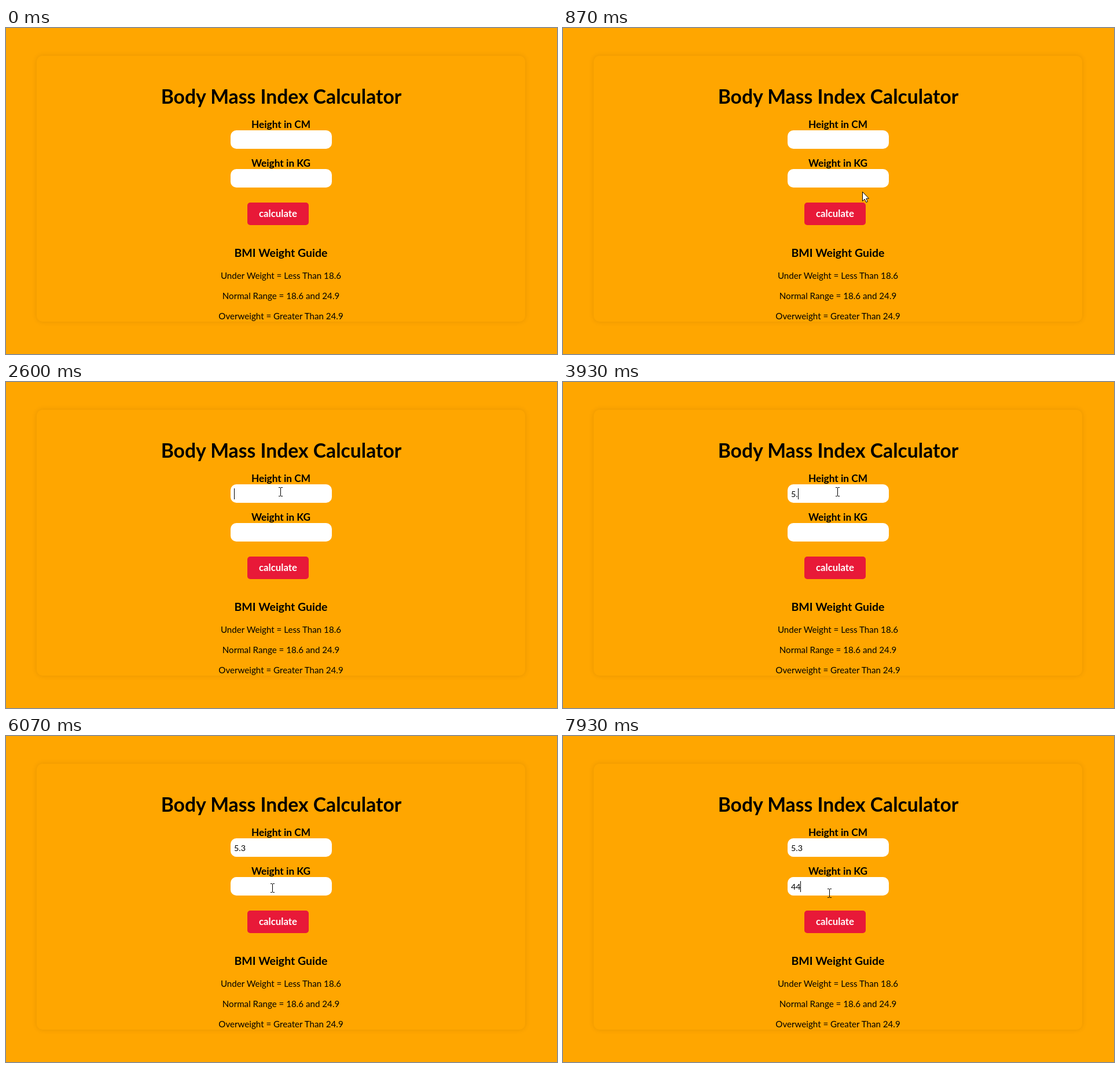
An HTML page that plays this animation: 952x564 px, repeating every 8 s.

```html
<!DOCTYPE html>
<html lang="en">
<head>
<meta charset="utf-8">
<title>Body Mass Index Calculator</title>
<style>
  html, body { margin: 0; width: 100%; height: 100%; overflow: hidden; background: #ffa600; }
  .panel {
    position: absolute; left: 53px; top: 48px; width: 844px; height: 460px;
    border-radius: 10px; box-shadow: 0 0 10px rgba(0, 0, 0, .1);
  }
  svg { position: absolute; left: 0; top: 0; font-family: Lato, sans-serif; font-size: 15.15px; }
  .centred { text-anchor: middle; }
  .bold { font-weight: 700; font-size: 17.3px; }
  .value { font-size: 14.3px; }
</style>
</head>
<body>
<div class="panel"></div>
<svg width="952" height="564" viewBox="0 0 952 564">
  <g class="centred">
    <g class="bold">
      <text x="475.5" y="130.5" font-size="33.7">Body Mass Index Calculator</text>
      <text x="475" y="173">Height in CM</text>
      <text x="475" y="240">Weight in KG</text>
      <text x="475" y="396" font-size="19.5">BMI Weight Guide</text>
    </g>
    <text x="475" y="434">Under Weight = Less Than 18.6</text>
    <text x="475" y="469">Normal Range = 18.6 and 24.9</text>
    <text x="475" y="504">Overweight = Greater Than 24.9</text>
  </g>
  <g fill="#fff">
    <rect x="388" y="177" width="175" height="32" rx="10"/>
    <rect x="388" y="244" width="175" height="32" rx="10"/>
  </g>
  <rect x="417" y="302" width="106" height="39" rx="5" fill="#e81938"/>
  <text class="centred" x="470" y="327" fill="#fff" font-weight="700" font-size="16.75">calculate</text>
  <text class="value" id="height" x="394" y="199"></text>
  <text class="value" id="weight" x="394" y="266"></text>
  <rect id="caret" width="1" height="19"/>
  <path id="arrow" d="M.5 .5V16.5L4.2 13L6.8 18.5L9.2 17.5L6.8 12H11.5Z" fill="#fff" stroke="#000"/>
  <path id="beam" d="M-3 -7.5H0M1 -7.5H4M.5 -7V7M-3 7.5H0M1 7.5H4" fill="none" stroke="#000"/>
</svg>
<script>
const FPS = 15, TICKS = 120;
const BLINK = 8;
const FIELD_TOPS = [177, 244];
const $ = id => document.getElementById(id);

// tick, height text, weight text, focused field, caret x
const edits = [
  [0, '', '', -1, 0],
  [23, '', '', 0, 394],
  [48, '5', '', 0, 402],
  [59, '5.', '', 0, 406],
  [67, '5.3', '', 0, 414],
  [83, '5.3', '', 1, 394],
  [97, '5.3', '4', 1, 402],
  [115, '5.3', '44', 1, 410]
];

// tick, pointer x, pointer y
const path = [
  [2, 951, 562], [6, 951, 562], [7, 915, 538], [9, 735, 418], [11, 590, 326],
  [13, 517, 283], [15, 498, 256], [17, 481, 217], [19, 474, 191], [20, 474, 191],
  [21, 474, 190], [75, 474, 190], [76, 469, 217], [78, 460, 279], [79, 460, 277],
  [82, 460, 263], [118, 460, 263], [119, 460, 272]
];

function pointerAt(tick) {
  const next = path.findIndex(p => p[0] >= tick);
  if (next < 1) return path[0].slice(1);
  const [t0, x0, y0] = path[next - 1], [t1, x1, y1] = path[next];
  const k = (tick - t0) / (t1 - t0);
  return [Math.round(x0 + (x1 - x0) * k), Math.round(y0 + (y1 - y0) * k)];
}

function show(element, visible, x, y) {
  element.style.display = visible ? '' : 'none';
  element.setAttribute('transform', `translate(${x} ${y})`);
}

function draw(now) {
  // the small offset absorbs rounded frame times
  const tick = Math.floor((now % 8000 + 4) * FPS / 1000) % TICKS;
  const [start, height, weight, field, caretX] = edits.findLast(e => e[0] <= tick);
  $('height').textContent = height;
  $('weight').textContent = weight;
  const lit = Math.floor((tick - start) / BLINK) % 2 === 0;
  show($('caret'), field >= 0 && lit, caretX, (FIELD_TOPS[field] || 0) + 7);

  const [x, y] = pointerAt(tick);
  const inField = x >= 388 && x < 563 && FIELD_TOPS.some(top => y >= top && y < top + 32);
  show($('arrow'), tick >= 2 && !inField, x, y);
  show($('beam'), inField, x, y);
}

function loop(now) {
  draw(now);
  requestAnimationFrame(loop);
}
draw(0);
requestAnimationFrame(loop);
</script>
</body>
</html>
```
